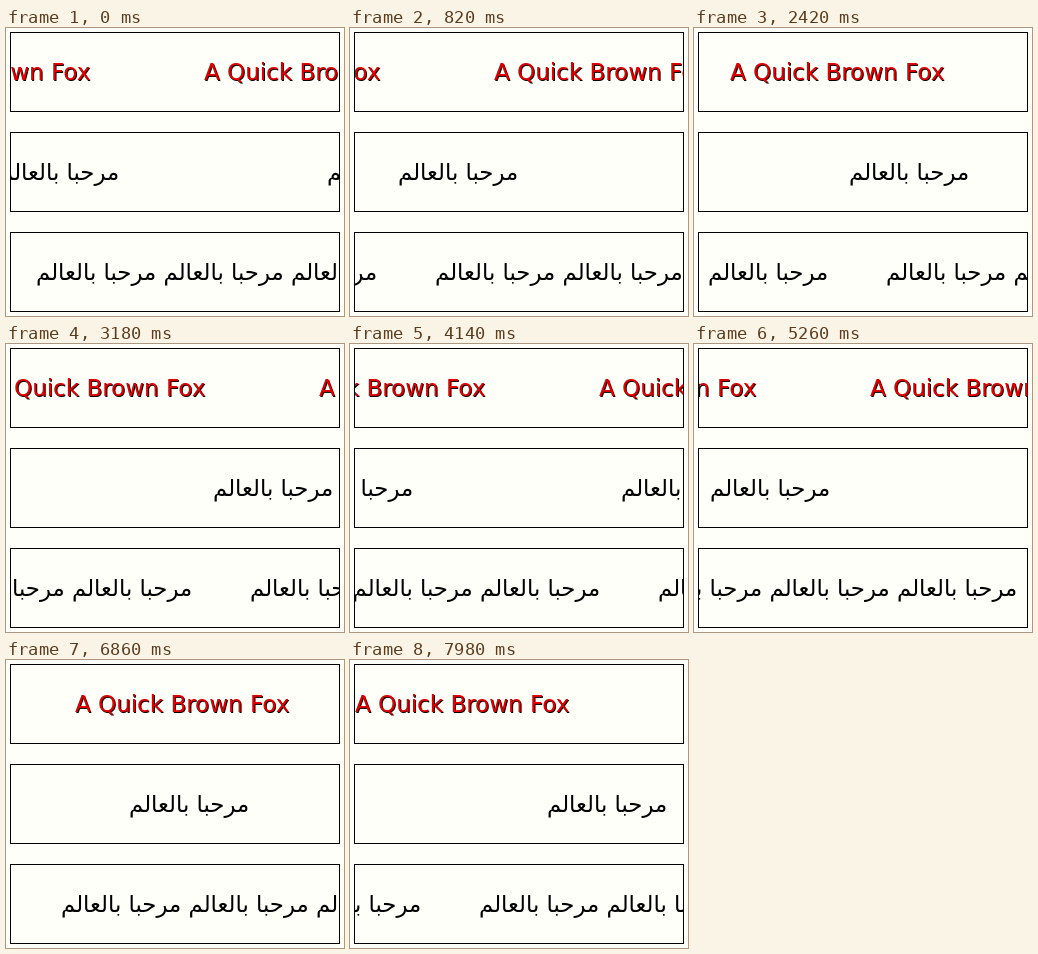
An HTML page with a canvas for the animation above (8000 ms loop, 338x288 px).

```html
<!DOCTYPE html>
<html lang="en">
<head>
<meta charset="utf-8">
<title>Scrolling text</title>
<style>
  html, body { margin: 0; width: 100%; height: 100%; overflow: hidden; background: #fffffa; }
  canvas { display: block; }
</style>
</head>
<body>
<canvas id="stage" width="338" height="288"></canvas>
<script>
const ctx = document.getElementById('stage').getContext('2d');
const LOOP = 8000, STEP = 20;
const hello = 'مرحبا بالعالم';

// Each row scrolls from `start` and repeats every `period` pixels; `limit` stops it.
const rows = [
  { text: 'A Quick Brown Fox', top: 4, size: 23, start: 198.4, dir: -1, period: 328, limit: 521, color: '#e00000', shadow: true },
  { text: hello, top: 104, size: 22.8, start: -6, dir: 1, period: 328, limit: Infinity, color: '#000', rtl: true },
  { text: [hello, hello, hello].join(' '), top: 204, size: 22.8, start: 31, dir: 1, period: 433, limit: Infinity, color: '#000', rtl: true },
];

// Distance travelled at given times; the pace is very slightly uneven.
const pace = [[0, 0], [1660, 110.6], [3180, 213.6], [4140, 277.6], [5260, 350.7], [6860, 457.5], [8000, 533.4]];

function travelled(t) {
  const i = pace.findIndex(([time]) => time > t);
  const [t0, d0] = pace[i - 1], [t1, d1] = pace[i];
  return d0 + (d1 - d0) * (t - t0) / (t1 - t0);
}

function drawRow(row, distance) {
  ctx.save();
  ctx.strokeStyle = '#000';
  ctx.strokeRect(4.5, row.top + 0.5, 329, 79);
  ctx.beginPath();
  ctx.rect(5, row.top + 1, 328, 78);
  ctx.clip();

  ctx.font = `${row.size}px "DejaVu Sans", sans-serif`;
  ctx.direction = row.rtl ? 'rtl' : 'ltr';
  ctx.textAlign = 'left';
  const inkOffset = ctx.measureText(row.text).actualBoundingBoxLeft;
  const baseline = row.top + 48;
  const offset = Math.round(row.start + row.dir * Math.min(distance, row.limit));
  const first = ((offset % row.period) + row.period) % row.period - row.period;

  for (let left = first; left < 338; left += row.period) {
    const x = left + inkOffset;
    if (row.shadow) {
      ctx.fillStyle = '#000';
      ctx.fillText(row.text, x + 1, baseline + 1);
    }
    ctx.fillStyle = row.color;
    ctx.fillText(row.text, x, baseline);
  }
  ctx.restore();
}

function draw() {
  const t = Math.floor(performance.now() % LOOP / STEP) * STEP;
  ctx.fillStyle = '#fffffa';
  ctx.fillRect(0, 0, 338, 288);
  const distance = travelled(t);
  rows.forEach(row => drawRow(row, distance));
  requestAnimationFrame(draw);
}
draw();
</script>
</body>
</html>
```
